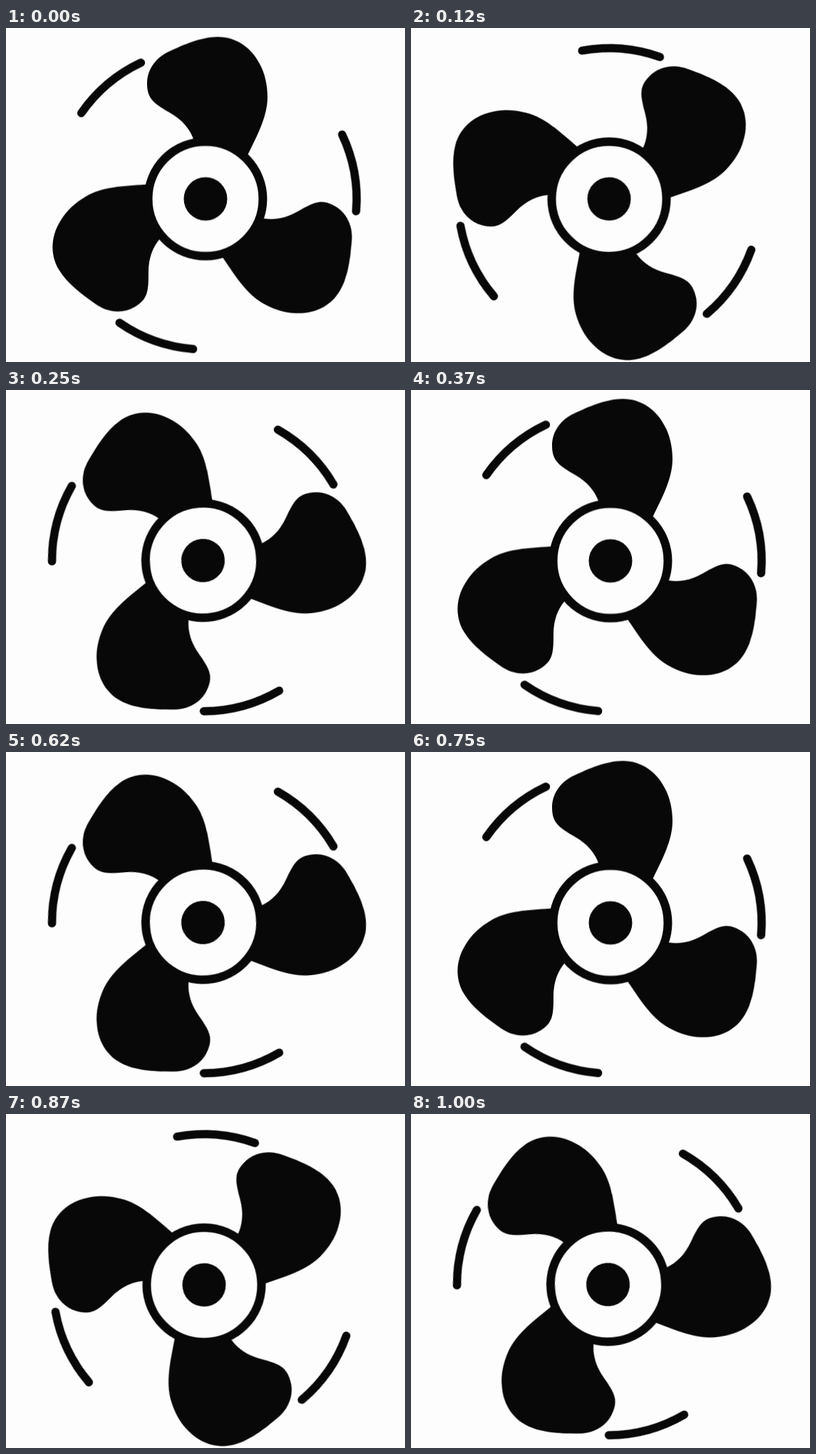
An HTML page for the animation above (1120 ms loop, 560 px wide and 470 px high).

```html
<!DOCTYPE html>
<html lang="en">
<head>
<meta charset="utf-8">
<title>Spinning propeller</title>
<style>
  html, body { margin: 0; width: 100%; height: 100%; overflow: hidden; background: #fdfdfd; }
  svg { display: block; width: 560px; height: 470px; }
</style>
</head>
<body>
<svg viewBox="0 0 560 470">
  <defs>
    <g id="arm">
      <path fill="#080808" d="M-8-64L-17-84.5
        C-22-98-32-111-50-121.3
        C-70.8-133.3-82-140-82-162
        C-82-184-68-199.6-51-207.5
        C-31-216.8-6-228 17-228
        C44-228 65-212 76-190
        C83-177.5 87-161 87-143.5
        C87-117 74-92 60-63.5L50-45Z"/>
      <path fill="none" stroke="#080808" stroke-width="11.5" stroke-linecap="round"
        d="M-174.3-120.7A212 212 0 0 1-90.6-191.7"/>
    </g>
  </defs>
  <g id="fan">
    <use href="#arm"/>
    <use href="#arm" transform="rotate(120)"/>
    <use href="#arm" transform="rotate(240)"/>
    <circle r="80.5" fill="#fdfdfd" stroke="#080808" stroke-width="12"/>
    <circle r="30.5" fill="#080808"/>
  </g>
</svg>
<script>
  const LOOP = 1120;
  const times = [0, 120, 250, 370, 500, 620, 750, 870, 1000];

  // Hub position and turn; the three poses repeat in order.
  const poses = [[280, 240.5, 0], [278, 240.5, 45], [276.5, 240, 85]];

  const step = (t, i) => {
    const [x, y, turn] = poses[i % poses.length];
    return {
      offset: t / LOOP,
      easing: 'step-end',
      transform: `translate(${x}px, ${y}px) rotate(${turn}deg)`
    };
  };

  const frames = times.map(step);
  frames.push({ ...frames[frames.length - 1], offset: 1 });
  document.getElementById('fan').animate(frames, { duration: LOOP, iterations: Infinity });
</script>
</body>
</html>
```
